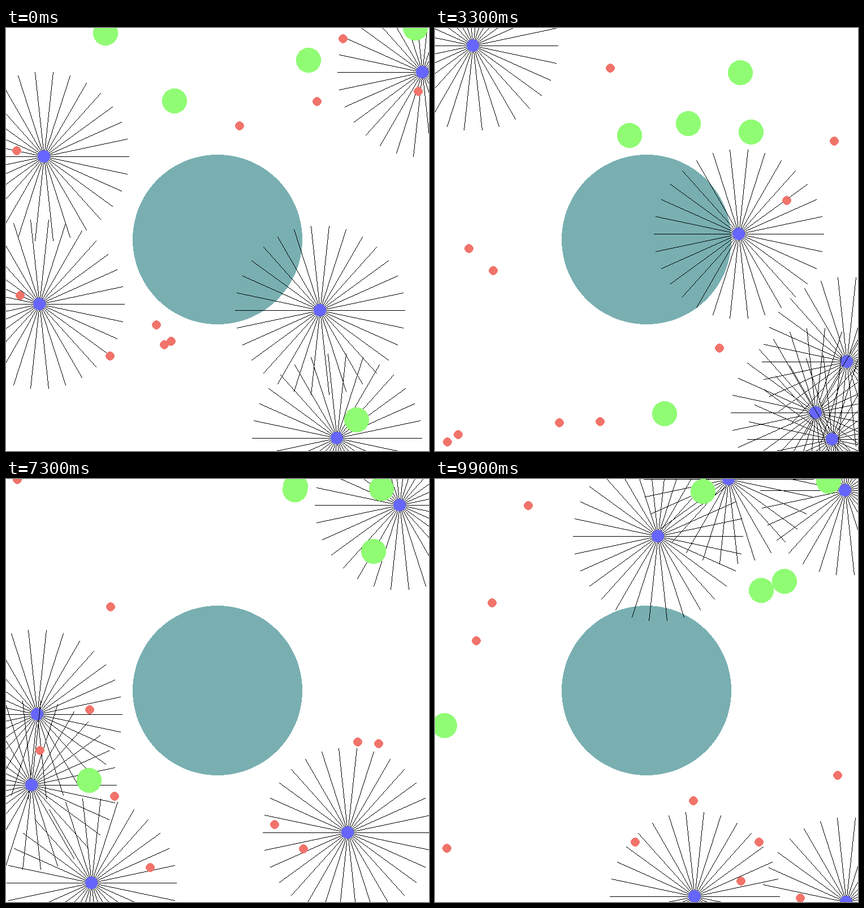
Write an HTML page with a canvas that moves like this. It is 748 by 748 pixels and loops after 10000 ms.

```html
<!DOCTYPE html>
<html lang="en">
<head>
<meta charset="utf-8">
<title>Roaming dots</title>
<style>
  html, body { margin: 0; width: 100%; height: 100%; overflow: hidden; background: #fff; }
  canvas { display: block; width: 100vw; height: 100vh; image-rendering: pixelated; }
</style>
</head>
<body>
<canvas id="stage" width="748" height="748"></canvas>
<script>
const SIZE = 748, STEP = 100, STEPS = 100;
const SPEED = 7.48;        // pixels per step, the same for every dot
const RAYS = 30, REACH = 150;
const HUB = 373;           // centre of the obstacle, on both axes
const ctx = document.getElementById('stage').getContext('2d');

// hit: distance from the hub at which a dot of this kind bounces
const red = { r: 7.7, hit: 158.5, color: '#f1736a' };
const green = { r: 22, hit: 168.5, color: '#90fc74' };

const dot = (kind, x, y, heading, reborn) => ({ kind, x, y, heading, reborn });
const birth = (step, x, y, heading, speed = SPEED) => ({ step, x, y, heading, speed });

// Start and heading in degrees; a caught dot is reborn elsewhere
const dots = [
  dot(red, 550, 130, 193.9),
  dot(red, 596, 19, -63.5),
  dot(red, 413, 173, 32.3),
  dot(red, 19.2, 217, 120.6),
  dot(red, 291.5, 553.6, 90),
  dot(red, 729, 112, 93.9, birth(6, 487.9, 506.9, 75.4, 2.27)),
  dot(red, 25, 473, 86.3),
  dot(red, 184, 580, 131, birth(59, 383, 541, 37.3, 8.25)),
  dot(red, 280, 560, 104),
  dot(red, 266.4, 525, 213.2, birth(94, 680, 543, -31)),
  dot(green, 176, 9, 47.15),
  dot(green, 298, 129, -11.8),
  dot(green, 535.3, 57, 249.33),
  dot(green, 724, 0.4, 131.88),
  dot(green, 620, 693, 150.1)
];

// Hunters wrap around the edges, so their waypoints may lie outside the stage
const marks = [0, 22, 33, 49, 73, 89, 99];
const hunters = [
  [[67, 227], [79, 51], [67, 31], [24, 171], [55, 416], [68, 286], [-23, 20]],
  [[59, 488], [-4, 568], [-20, 590], [-15, 509], [45, 541], [-238, 736], [-289, 738]],
  [[555, 499], [485, 629], [673, 680], [375, 712], [151, 714], [271, 897], [394, 849]],
  [[585, 725], [681, 729], [702, 727], [589, 733], [696, 794], [707, 876], [727, 747.9]],
  [[736, 78], [714, 264], [537, 364], [533, 411], [604, 625], [571, 737], [519, 748]]
];

function launch(body, { x, y, heading, speed = SPEED }) {
  const a = heading * Math.PI / 180;
  Object.assign(body, { x, y, vx: speed * Math.cos(a), vy: speed * Math.sin(a) });
}

function move(body, hit) {
  body.x += body.vx / 2;
  body.y += body.vy / 2;
  if (body.x < 0) body.vx = Math.abs(body.vx);
  if (body.x > SIZE) body.vx = -Math.abs(body.vx);
  if (body.y < 0) body.vy = Math.abs(body.vy);
  if (body.y > SIZE) body.vy = -Math.abs(body.vy);

  const dx = body.x - HUB, dy = body.y - HUB, d = Math.hypot(dx, dy);
  const inward = (body.vx * dx + body.vy * dy) / d;
  if (d < hit && inward < 0) {
    body.vx -= 2 * inward * dx / d;
    body.vy -= 2 * inward * dy / d;
  }
}

// Whole path of a dot, two moves per shown step
function trace(d) {
  const body = {}, path = [];
  launch(body, d);
  for (let n = 0; n < STEPS; n++) {
    if (d.reborn && d.reborn.step === n) launch(body, d.reborn);
    path.push([body.x, body.y]);
    move(body, d.kind.hit);
    move(body, d.kind.hit);
  }
  return path;
}

const paths = dots.map(trace);
const wrap = v => ((v % SIZE) + SIZE) % SIZE;

function hunterAt(points, n) {
  let i = 0;
  while (i < marks.length - 2 && n >= marks[i + 1]) i++;
  const k = (n - marks[i]) / (marks[i + 1] - marks[i]);
  return [0, 1].map(a => wrap(points[i][a] + (points[i + 1][a] - points[i][a]) * k));
}

// Hard-edged disc, one row at a time
function disc([x, y], r, color) {
  const cx = Math.round(x), cy = Math.round(y);
  ctx.fillStyle = color;
  for (let row = -Math.ceil(r); row < r; row++) {
    const d = row + 0.5;
    if (Math.abs(d) > r) continue;
    const half = Math.round(Math.sqrt(r * r - d * d));
    ctx.fillRect(cx - half, cy + row, 2 * half, 1);
  }
}

// Hard-edged line, one pixel wide
function line(x0, y0, x1, y1) {
  const dx = x1 - x0, dy = y1 - y0;
  const count = Math.max(Math.abs(dx), Math.abs(dy));
  for (let i = 0; i <= count; i++) {
    ctx.fillRect(Math.round(x0 + dx * i / count), Math.round(y0 + dy * i / count), 1, 1);
  }
}

function hunter([x, y]) {
  const cx = Math.round(x), cy = Math.round(y);
  const end = (c, offset) => Math.floor(c + 0.4 + REACH * offset);
  ctx.fillStyle = '#000';
  for (let i = 0; i < RAYS; i++) {
    const a = i * 2 * Math.PI / RAYS;
    line(cx, cy, end(cx, Math.cos(a)), end(cy, Math.sin(a)));
  }
  disc([cx, cy], 11, '#6666ff');
}

function draw(n) {
  ctx.fillStyle = '#fff';
  ctx.fillRect(0, 0, SIZE, SIZE);
  disc([374, 374], 150, '#79afb1');
  hunters.forEach(points => hunter(hunterAt(points, n)));
  dots.forEach(({ kind }, i) => disc(paths[i][n], kind.r, kind.color));
}

const start = performance.now();
let shown = -1;
function tick() {
  const n = Math.floor((performance.now() - start) / STEP) % STEPS;
  if (n !== shown) draw(shown = n);
  requestAnimationFrame(tick);
}
tick();
</script>
</body>
</html>
```
